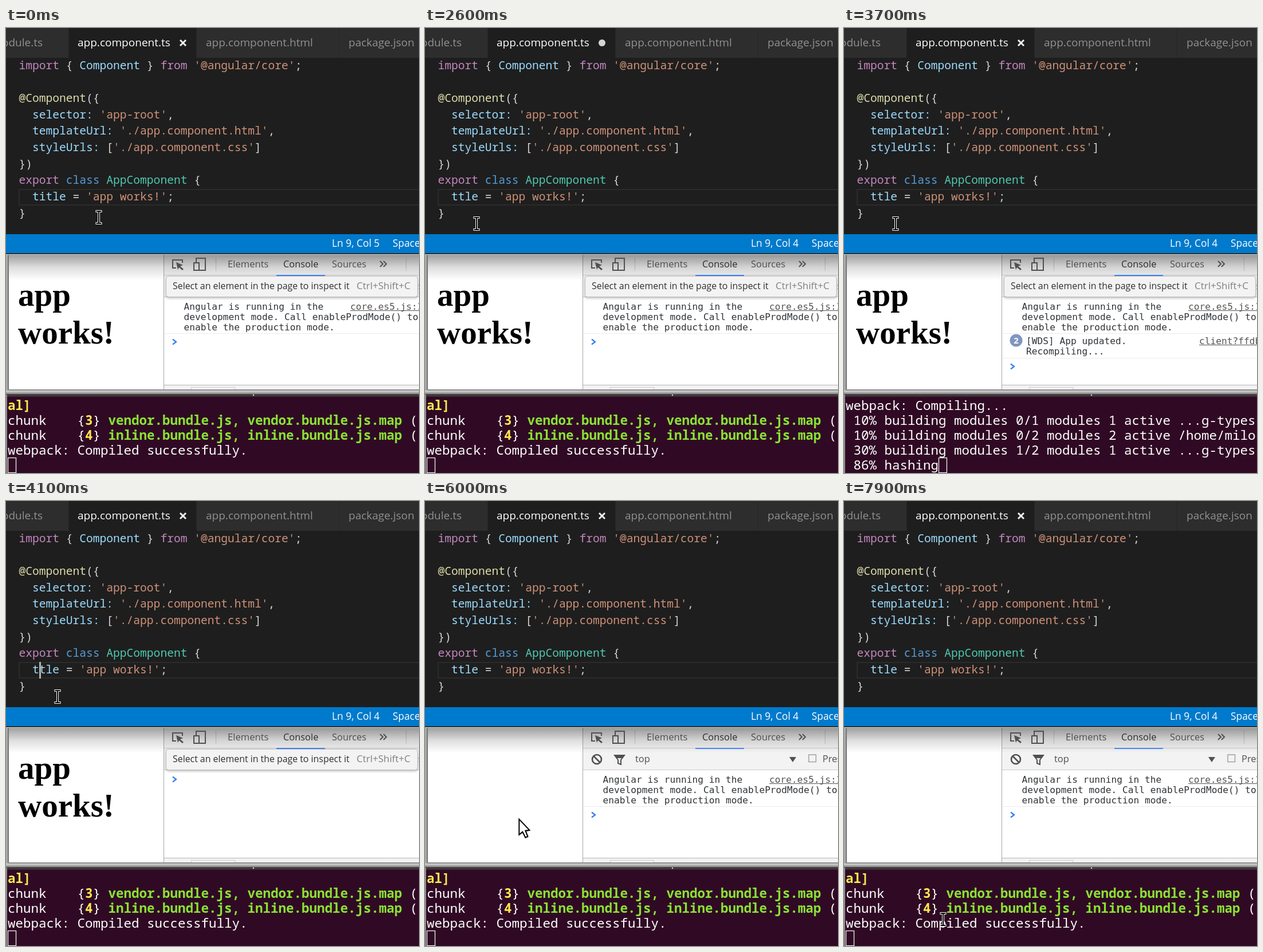
An HTML page with a canvas for the animation above (8000 ms loop, 721 by 777 pixels).

```html
<!DOCTYPE html>
<html lang="en">
<head>
<meta charset="utf-8">
<title>Live reload</title>
<style>
html, body { margin: 0; width: 100%; height: 100%; overflow: hidden; background: #1e1e1e; }
canvas { display: block; }
</style>
</head>
<body>
<canvas id="stage" width="721" height="777"></canvas>
<script>
const ctx = document.getElementById('stage').getContext('2d');
const LOOP = 8000, STEP = 100;
const EDIT = 2100, SAVE = 3400, RELOAD = 4100, BLANK = 4400, BOOT = 4600, LEAVE = 4800;

const UI = '"Open Sans", "Noto Sans", sans-serif';
const CODE = '19.6px "Noto Sans Mono", monospace';
const SHELL = '22.5px "Noto Sans Mono", monospace';
const LOG = '16.2px "DejaVu Sans Mono", monospace';
const CELL = 13.5;

const COLORS = {
  k: '#c586c0', v: '#9cdcfe', s: '#ce9178', c: '#569cd6', t: '#4ec9b0', d: '#dcdcaa', p: '#d4d4d4',
  w: '#ffffff', y: '#fce94f', g: '#8ae234'
};

// Mouse path: time, x, y
const PATH = [
  [100, 162, 331], [700, 54, 331], [1000, 75, 333], [1300, 75, 335], [1500, 90, 342],
  [4700, 90, 342], [5000, 47, 453], [5600, 110, 540], [5900, 110, 540], [6200, 270, 584],
  [6400, 534, 548], [6600, 488, 540], [6800, 452, 559], [6900, 375, 713], [7000, 375, 713],
  [7400, 411, 734], [7500, 411, 734], [7900, 173, 731]
];

function rect(x, y, w, h, color) {
  ctx.fillStyle = color;
  ctx.fillRect(x, y, w, h);
}

function text(str, x, y, font, color, align = 'left') {
  ctx.font = font;
  ctx.fillStyle = color;
  ctx.textAlign = align;
  ctx.fillText(str, x, y);
}

const ui = (str, x, y, size, color, align) => text(str, x, y, `${size}px ${UI}`, color, align);

// Alternating colour keys and strings; yellow and green are bold
function runs(x, y, font, ...parts) {
  for (let i = 0; i < parts.length; i += 2) {
    const bold = 'yg'.includes(parts[i]) ? 'bold ' : '';
    text(parts[i + 1], x, y, bold + font, COLORS[parts[i]]);
    x += ctx.measureText(parts[i + 1]).width;
  }
}

function line(points, color, width, close) {
  ctx.beginPath();
  points.forEach(([x, y]) => ctx.lineTo(x, y));
  if (close) ctx.closePath();
  ctx.strokeStyle = color;
  ctx.lineWidth = width;
  ctx.stroke();
}

function fillPoly(points, color) {
  ctx.beginPath();
  points.forEach(([x, y]) => ctx.lineTo(x, y));
  ctx.fillStyle = color;
  ctx.fill();
}

function disc(x, y, r, color) {
  ctx.beginPath();
  ctx.arc(x, y, r, 0, 7);
  ctx.fillStyle = color;
  ctx.fill();
}

function fade(y0, y1, ...stops) {
  const g = ctx.createLinearGradient(0, y0, 0, y1);
  stops.forEach((color, i) => g.addColorStop(i / (stops.length - 1), color));
  rect(0, y0, 721, y1 - y0, g);
}

function drawEditor(t) {
  const edited = t >= EDIT;
  rect(0, 0, 721, 361, '#1e1e1e');
  rect(0, 0, 721, 52, '#252526');
  rect(0, 0, 109, 52, '#2d2d2d');
  rect(110, 0, 222, 52, '#1e1e1e');
  rect(333, 0, 248, 52, '#2d2d2d');
  rect(582, 0, 139, 52, '#2d2d2d');
  ui('module.ts', 64, 32, 19, '#919191', 'right');
  ui('app.component.ts', 125, 32, 19, '#ffffff');
  ui('app.component.html', 349, 32, 19, '#919191');
  ui('package.json', 598, 32, 19, '#919191');
  if (edited && t < SAVE) {
    disc(309, 26, 6, '#d4d4d4');
  } else {
    line([[304, 21], [314, 31]], '#eeeeee', 3);
    line([[304, 31], [314, 21]], '#eeeeee', 3);
  }

  ctx.strokeStyle = '#2b2b2b';
  ctx.lineWidth = 2;
  ctx.strokeRect(23, 282, 720, 27);
  [
    ['k', 'import', 'p', ' { ', 'v', 'Component', 'p', ' } ', 'k', 'from ', 's', "'@angular/core'", 'p', ';'],
    [],
    ['d', '@Component', 'p', '({'],
    ['v', '  selector: ', 's', "'app-root'", 'p', ','],
    ['v', '  templateUrl: ', 's', "'./app.component.html'", 'p', ','],
    ['v', '  styleUrls: ', 'p', '[', 's', "'./app.component.css'", 'p', ']'],
    ['p', '})'],
    ['k', 'export ', 'c', 'class ', 't', 'AppComponent', 'p', ' {'],
    ['v', edited ? '  ttle' : '  title', 'p', ' = ', 's', "'app works!'", 'p', ';'],
    ['p', '}']
  ].forEach((parts, i) => runs(22.5, 71.7 + 28.65 * i, CODE, ...parts));

  const blink = Math.floor((t - (edited ? EDIT : 300)) / 500);
  if (blink % 2 === 0) rect(edited ? 58 : 69, 281, 3, 29, '#b4b4ae');

  rect(0, 360, 721, 33, '#007acc');
  ui(`Ln 9, Col ${edited ? 4 : 5}`, 569, 382, 17.4, '#ffffff');
  ui('Spaces: 2', 675, 382, 17.4, '#ffffff');
}

function drawToolIcons() {
  const ink = '#505050';
  line([[297, 419], [291, 419], [291, 405], [308, 405], [308, 410]], ink, 2);
  fillPoly([[297, 409], [309, 414], [304, 416], [310, 421], [308, 423], [302, 418], [300, 422]], ink);
  line([[332, 409], [332, 402], [348, 402], [348, 423], [338, 423]], ink, 2);
  line([[328, 410], [337, 410], [337, 423], [328, 423]], ink, 2, true);
  line([[653, 407], [658, 412], [653, 417]], ink, 2);
  line([[659, 407], [664, 412], [659, 417]], ink, 2);

  ctx.beginPath();
  ctx.arc(300, 451, 8, 0, 7);
  ctx.strokeStyle = ink;
  ctx.lineWidth = 2.6;
  ctx.stroke();
  line([[294, 445], [306, 457]], ink, 2.6);
  line([[331, 444], [348, 444], [342, 452], [342, 460], [337, 458], [337, 452]], ink, 2, true);
  fillPoly([[330, 443], [349, 443], [345, 449], [334, 449]], ink);
  fillPoly([[636, 447], [648, 447], [642, 456]], ink);
  ctx.strokeStyle = '#a0a0a0';
  ctx.lineWidth = 1.5;
  ctx.strokeRect(670, 443, 12.5, 12.5);
}

function logLink(str, x, y) {
  text(str, x, y, LOG, '#545454');
  rect(x, y + 1.5, 721 - x, 1, '#545454');
}

function drawConsole(t) {
  const log = (str, x, y) => text(str, x, y, LOG, '#303438');
  const updates = t >= 3700 ? 2 : t >= 3600 ? 1 : 0;
  let prompt = 548;
  if (t >= RELOAD && t < BOOT) {
    prompt = 486;
  } else {
    log('Angular is running in the', 310.5, 491.5);
    log('development mode. Call enableProdMode() to', 310.5, 509.5);
    log('enable the production mode.', 310.5, 527.5);
    logLink('core.es5.js:1', 601, 491.5);
    rect(277, 533, 444, 1, '#ebebeb');
    if (updates && t < RELOAD) {
      prompt = 591;
      if (updates > 1) {
        disc(300.5, 545.5, 11, '#7f96c1');
        text('2', 300.5, 551, `bold 15px ${UI}`, '#ffffff', 'center');
      }
      const x = updates > 1 ? 318 : 310.5;
      log('[WDS] App updated.', x, 551.5);
      log('Recompiling...', x, 569.5);
      logLink('client?ffdb', 620, 551.5);
      rect(277, 576, 444, 1, '#ebebeb');
    }
  }
  line([[291, prompt - 4.5], [297, prompt], [291, prompt + 4.5]], '#367cf1', 2.2);
}

function drawBrowser(t) {
  rect(0, 393, 721, 247, '#ffffff');
  rect(276, 396, 445, 74, '#f3f3f3');
  rect(276, 431, 445, 1, '#cccccc');
  rect(276, 469, 445, 1, '#cccccc');
  rect(276, 623, 445, 10, '#f3f3f3');
  rect(276, 623, 445, 1, '#b5b5b5');
  rect(323, 627, 77, 5, '#c8c8c8');
  rect(324, 628, 75, 4, '#ffffff');
  rect(275, 396, 1, 237, '#a8a8a8');
  rect(366, 401, 1, 23, '#cccccc');
  rect(698, 401, 1, 23, '#cccccc');
  fade(396, 440, 'rgba(0,0,0,.38)', 'rgba(0,0,0,.13)', 'rgba(0,0,0,0)');
  rect(0, 393, 721, 2, '#2a2f33');
  rect(0, 395, 721, 1, '#d8d8d8');

  drawToolIcons();
  ui('Elements', 387, 418, 16.6, '#4e4e4e');
  ui('Console', 484, 418, 16.4, '#2c2c2c');
  ui('Sources', 569, 418, 16.4, '#4e4e4e');
  rect(472, 431, 85, 2, '#4285f4');
  ui('top', 367, 456, 16.5, '#505050');
  ui('Preserve log', 694, 456, 16.5, '#505050');

  if (t < LEAVE) {
    ctx.save();
    ctx.shadowColor = 'rgba(0,0,0,.3)';
    ctx.shadowBlur = 4;
    ctx.shadowOffsetY = 2;
    ctx.beginPath();
    ctx.roundRect(279.5, 433.5, 439, 36, 4);
    ctx.fillStyle = '#f3f3f3';
    ctx.fill();
    ctx.restore();
    ctx.strokeStyle = '#bdbdbd';
    ctx.lineWidth = 1;
    ctx.stroke();
    ui('Select an element in the page to inspect it', 291, 456, 15.9, '#303030');
    ui('Ctrl+Shift+C', 612, 456, 17, '#808080');
  }
  if (t < BLANK) {
    const font = 'bold 57px "Liberation Serif", serif';
    text('app', 21, 485, font, '#000000');
    text('works!', 21, 551, font, '#000000');
  }
  drawConsole(t);

  rect(0, 396, 3, 244, '#a9a9a9');
  rect(3, 396, 2, 237, '#777777');
  rect(3, 631, 718, 2, '#8c8c8c');
  fade(633, 639, '#d8d8d8', '#8a8a8a');
  fade(639, 644, '#4a4644', '#382a32');
  disc(432, 641, 1.2, '#e0e0e0');
}

function shellLines(t) {
  const build = [
    ['w', 'webpack: Compiling...'],
    ['w', ' 10% building modules 0/1 modules 1 active ...g-types'],
    ['w', ' 10% building modules 0/2 modules 2 active /home/milo'],
    ['w', ' 30% building modules 1/2 modules 1 active ...g-types']
  ];
  const chunk = (id, name) => ['w', 'chunk    {', 'y', id, 'w', '} ',
    'g', `${name}.bundle.js, ${name}.bundle.js.map`, 'w', ' ('];
  const done = [
    ['y', 'al]'], chunk('3', 'vendor'), chunk('4', 'inline'),
    ['w', 'webpack: Compiled successfully.'], ['w', '']
  ];
  if (t < 3500 || t >= 3900) return done;
  if (t < 3600) return [...done.slice(1, 4), build[0], ['w', '']];
  if (t < 3700) return [done[3], ...build];
  return [...build, ['w', t < 3800 ? ' 86% hashing' : ' 95% emitting']];
}

function drawTerminal(t) {
  rect(0, 644, 721, 133, '#300a24');
  rect(0, 640, 2, 137, '#8f8a8c');
  const lines = shellLines(t);
  lines.forEach((parts, i) => runs(3, 667 + 26 * i, SHELL, ...parts));
  ctx.strokeStyle = '#ffffff';
  ctx.lineWidth = 1.2;
  ctx.strokeRect(3.5 + CELL * lines[4][1].length, 750.5, 14, 26);
}

function mouseAt(t) {
  const i = PATH.findIndex(p => p[0] > t);
  if (i < 0) return PATH[PATH.length - 1].slice(1);
  if (i === 0) return PATH[0].slice(1);
  const [t0, x0, y0] = PATH[i - 1], [t1, x1, y1] = PATH[i];
  const k = (t - t0) / (t1 - t0);
  return [x0 + (x1 - x0) * k, y0 + (y1 - y0) * k];
}

function drawMouse(t) {
  const [x, y] = mouseAt(t);
  const beam = y < 361 || y > 640 || (x > 276 && y > 470 && y < 623);
  ctx.save();
  ctx.translate(x, y);
  if (beam) {
    for (const [color, width, end] of [['#ffffff', 4, 5.5], ['#000000', 2, 4.5]]) {
      line([[0, -11], [0, 10]], color, width);
      line([[-end, -11], [end, -11]], color, width);
      line([[-end, 10], [end, 10]], color, width);
    }
  } else {
    const arrow = [[1, 1], [1, 28], [7, 23], [12, 33], [16, 31], [12, 21], [19, 20]];
    ctx.shadowColor = 'rgba(0,0,0,.35)';
    ctx.shadowBlur = 3;
    ctx.shadowOffsetX = ctx.shadowOffsetY = 1;
    fillPoly(arrow, '#ffffff');
    ctx.shadowColor = 'transparent';
    line(arrow, '#000000', 2, true);
  }
  ctx.restore();
}

function frame(now) {
  const t = Math.floor(now % LOOP / STEP) * STEP;
  drawEditor(t);
  drawBrowser(t);
  drawTerminal(t);
  drawMouse(t);
  requestAnimationFrame(frame);
}
requestAnimationFrame(frame);
</script>
</body>
</html>
```
